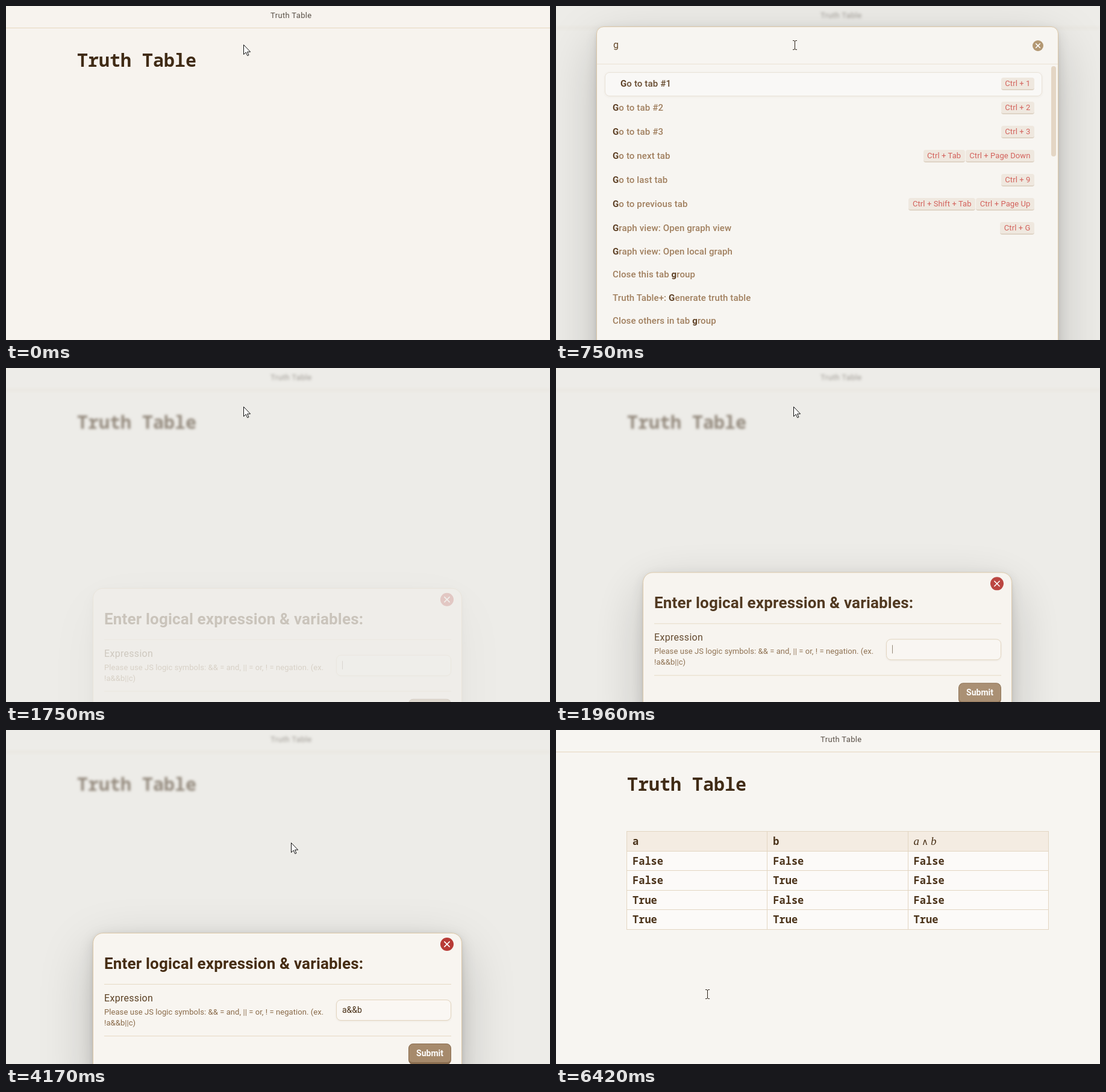
Recreate the animation shown at these times as an HTML page. Size 903x555 px, loop 6490 ms.

```html
<!DOCTYPE html>
<html lang="en">
<head>
<meta charset="utf-8">
<title>Truth Table</title>
<style>
  * { box-sizing: border-box; }
  html, body { margin: 0; width: 100%; height: 100%; overflow: hidden; }
  body { position: relative; background: #f7f3ee; font-family: Roboto, sans-serif; color: #4a3219; }
  #page, #veil { position: absolute; inset: 0; }
  #veil { background: rgba(227, 227, 223, .5); }
  .t, .box { position: absolute; }
  .t { line-height: 20px; white-space: pre; }
  .mono { font-family: "Noto Sans Mono", monospace; }
  .caret { display: inline-block; width: 1px; height: 14px; vertical-align: -2px; background: #8d8171; }
  .tab { font-size: 13px; letter-spacing: .35px; color: #5a5148; }
  .h1 { font-size: 30px; font-weight: 600; color: #402b15; }
  .cell { position: absolute; width: 234.3px; height: 33.5px; padding-left: 9px; line-height: 32px;
    border: 1px solid #e3d6c2; background: #fcfaf8; font-size: 17px; font-weight: 600; }
  .cell.head { background: #f4ece2; font-weight: 700; }
  .math { font: italic 19px "Liberation Serif", serif; }
  .math b { font: 15px "DejaVu Sans", sans-serif; margin: 0 4px; }
  .modal { position: absolute; border: 1px solid #dcc7a6; background: #f8f5f0; overflow: hidden;
    box-shadow: 0 1.8px 7.3px rgba(0,0,0,.071), 0 6.3px 24.7px rgba(0,0,0,.112), 0 30px 90px rgba(0,0,0,.2); }
  #palette { left: 67px; top: 34px; width: 767px; max-height: 640px; border-radius: 12px; background: #f7f5f1; }
  #query { left: 27px; top: 20px; font-size: 16px; color: #654829; }
  #query i { font-style: normal; color: #b7a58f; }
  #rows { margin-top: 61px; padding: 12.5px 13px 14px; border-top: 1px solid #ebe3d4; }
  #rows.scroll { padding-right: 26px; }
  .row { display: flex; align-items: center; height: 38.5px; padding: 0 13px; white-space: pre;
    font-size: 15px; font-weight: 500; letter-spacing: .13px; color: #a07f5e; }
  .row.keyed { height: 40px; }
  .row span { flex: 1; position: relative; top: -1px; }
  .row b { font-weight: 700; color: #5e4126; }
  .row.on { padding: 0 12px 0 25px; border: 1px solid #e9e2d8; border-radius: 8px; background: #f9f8f6;
    color: #664a2e; box-shadow: 0 1px 4px rgba(90, 60, 20, .06); }
  kbd { font: 400 13px Roboto, sans-serif; letter-spacing: .1px; line-height: 19px; padding: 0 6.5px; margin-left: 1px;
    border-radius: 4px; border-bottom: 2px solid #dfd4c6; background: #efe8df; color: #d3625c; }
  #foot { display: flex; justify-content: center; align-items: center; height: 35px; font-size: 13px;
    color: #7d6144; border-top: 1px solid #ebe3d4; background: #f4efe8; white-space: pre; }
  #foot kbd { margin: 0 5px 0 13px; line-height: 16px; font-weight: 700; }
  #foot kbd.sign { font: 700 14px/16px "DejaVu Sans", sans-serif; }
  #foot kbd:first-child { margin-left: 0; }
  #thumb { left: 754px; top: 65px; width: 8px; height: 150px; border-radius: 4px; background: #e4d6c4; }
  #dialog { left: 144px; top: 337px; width: 613px; height: 260px; border-radius: 17px; }
  .title { font-size: 26px; font-weight: 700; letter-spacing: .17px; color: #462d13; }
  .name { font-size: 16px; letter-spacing: .3px; color: #5b4023; }
  .hint { font-size: 13px; letter-spacing: .07px; color: #8a6b4a; line-height: 17.5px; }
  .rule { position: absolute; left: 18px; width: 576px; height: 1px; background: #e6d9c3; }
  .field { left: 403px; top: 110px; width: 191px; height: 35px; border: 1px solid #e3d5bf; border-radius: 8px;
    background: #faf7f3; box-shadow: 0 1px 3px rgba(90, 60, 20, .08); }
  .submit { left: 523px; top: 183px; width: 71px; height: 35px; border: 1px solid #8b6e50; border-bottom-width: 4px;
    border-radius: 8px; background: #a68a6c; color: #fff; font-weight: 700; font-size: 14px; line-height: 30px; text-align: center; }
  svg { position: absolute; overflow: visible; }
</style>
</head>
<body>
<div id="page"></div>
<div id="veil"></div>
<div id="palette" class="modal">
  <div id="query" class="t"></div>
  <div id="rows"></div>
  <div id="foot"><kbd class="sign">↑↓</kbd>to navigate<kbd class="sign">↵</kbd>to use<kbd>esc</kbd>to dismiss</div>
  <div id="thumb" class="box"></div>
</div>
<div id="dialog" class="modal"></div>
<svg id="arrow" width="1" height="1"><path d="M.5 .5V16.5L4.2 13L6.8 18.6L9 17.6L6.5 12.2H11.6Z" fill="#fff" stroke="#111"/></svg>
<svg id="beam" width="1" height="1"><path d="M-3 -7.5H-1L.5 -6.5L2 -7.5H4M.5 -7V7M-3 7.5H-1L.5 6.5L2 7.5H4" fill="none" stroke="#2d241a"/></svg>

<script>
const LOOP = 6490, TICK = 70;
const $ = id => document.getElementById(id);
const show = (el, on) => el.style.display = on ? '' : 'none';
const clamp = v => Math.max(0, Math.min(1, v));
const label = (x, midY, cls, text) =>
  `<div class="t ${cls}" style="left:${x}px;top:${midY - 10}px">${text}</div>`;
const cross = (x, y, r, color) => {
  const a = r * .42;
  return `<svg width="1" height="1" style="left:${x}px;top:${y}px"><circle r="${r}" fill="${color}"/>
    <path d="M${-a} ${-a}L${a} ${a}M${a} ${-a}L${-a} ${a}" stroke="#fff" stroke-width="1.6"/></svg>`;
};
const caret = on => on ? '<span class="caret"></span>' : '';

function truthTable() {
  const word = v => v ? 'True' : 'False';
  const rows = [['a', 'b', '<span class="math">a<b>∧</b>b</span>']];
  for (let n = 0; n < 4; n++) {
    const a = n >> 1, b = n & 1;
    rows.push([a, b, a & b].map(word));
  }
  return rows.map((row, r) => row.map((text, c) =>
    `<div class="cell mono ${r ? '' : 'head'}" style="left:${117 + 233.3 * c}px;top:${168 + 32.5 * r}px">${text}</div>`
  ).join('')).join('');
}

$('page').innerHTML = label(439, 15.5, 'tab', 'Truth Table') + label(118, 89.5, 'mono h1', 'Truth Table') +
  '<div class="box" style="top:36px;width:100%;height:1px;background:#e6d6bf"></div>' +
  `<div id="table">${truthTable()}</div>` +
  '<div id="pageCaret" class="box" style="left:117px;width:1px;height:20px;background:#a39a8d"></div>';

$('palette').insertAdjacentHTML('beforeend', cross(732, 30.5, 9, '#b39873'));

$('dialog').innerHTML = cross(587, 18, 11, '#b83b36') +
  label(18, 49.5, 'title', 'Enter logical expression &amp; variables:') +
  label(18, 108, 'name', 'Expression') +
  label(18, 132, 'hint', 'Please use JS logic symbols: &amp;&amp; = and, || = or, ! = negation. (ex.\n!a&amp;&amp;b||c)') +
  '<div class="rule" style="top:84px"></div><div class="rule" style="top:170px"></div>' +
  '<div class="box field"></div><div id="expr" class="t" style="left:413px;top:117px;font-size:14px"></div>' +
  '<div class="box submit">Submit</div>';

const generate = 'Truth Table+: Generate truth table';
const keys = {
  'Go to tab #1': ['Ctrl + 1'], 'Go to tab #2': ['Ctrl + 2'], 'Go to tab #3': ['Ctrl + 3'],
  'Go to next tab': ['Ctrl + Tab', 'Ctrl + Page Down'], 'Go to last tab': ['Ctrl + 9'],
  'Go to previous tab': ['Ctrl + Shift + Tab', 'Ctrl + Page Up'],
  'Graph view: Open graph view': ['Ctrl + G'], 'Toggle inline math': ['Ctrl + Shift + 4'],
  'Toggle reading view': ['Ctrl + E']
};
const recent = [generate, 'Add file property', 'Add tag', 'Backlinks: Open backlinks', 'Bookmarks: Show bookmarks',
  'Close all other tabs', 'Close current tab', 'Command palette: Open', 'Copy file path', 'Cycle bullet', 'Delete current file',
  'Delete paragraph', 'Export to PDF'];
const startingWithG = ['Go to tab #1', 'Go to tab #2', 'Go to tab #3', 'Go to next tab', 'Go to last tab',
  'Go to previous tab', 'Graph view: Open graph view', 'Graph view: Open local graph', 'Close this tab group',
  generate, 'Close others in tab group', 'Toggle pin', 'Toggle highlight'];
const commands = [generate, 'Note composer: Merge current file with another file…',
  'Toggle default mode for new tabs', 'Outgoing links: Open outgoing links for the current file',
  'Toggle numbered list', 'Toggle inline math', 'Toggle reading view', 'Backlinks: Toggle backlinks in document',
  'Graph view: Open graph view', 'Toggle fold properties in current file', 'Toggle pin', 'Toggle highlight'];

// Greedy fuzzy match: marks matched letters, or returns null.
function mark(text, query) {
  let i = 0;
  const html = [...text].map(ch =>
    i < query.length && ch.toLowerCase() === query[i] ? (i++, `<b>${ch}</b>`) : ch).join('');
  return i === query.length ? html : null;
}

let listed = null;
function listCommands(query) {
  if (query === listed) return;
  listed = query;
  const pool = query === '' ? recent : query === 'g' ? startingWithG : commands;
  const scroll = query.length < 2;
  $('rows').className = scroll ? 'scroll' : '';
  show($('thumb'), scroll);
  $('rows').innerHTML = pool.filter(c => mark(c, query) !== null).map((c, i) => {
    const badges = (keys[c] || []).map(k => `<kbd>${k}</kbd>`).join('');
    return `<div class="row ${badges && 'keyed'} ${i ? '' : 'on'}"><span>${mark(c, query)}</span>${badges}</div>`;
  }).join('');
}

const queries = [[0, ''], [750, 'g'], [1020, 'ge'], [1220, 'gen'], [1290, 'gene'], [1490, 'gener']];
const exprs = [[0, ''], [2360, 'a'], [3090, 'a&amp;'], [3230, 'a&amp;&amp;'], [3630, 'a&amp;&amp;b']];
const latest = (steps, t) => steps.filter(s => s[0] <= t).pop()[1];

const route = [[0, 394, 64], [4030, 394, 64], [4450, 700, 537], [4780, 700, 537], [5270, 415, 290],
  [5330, 414, 286], [5460, 414, 286], [5670, 340, 250], [5950, 251, 439], [LOOP, 251, 439]];
const snap = (t, from) => from + Math.floor((t - from) / TICK) * TICK;

function mouse(t) {
  const i = route.findIndex(p => p[0] > t), [t0, x0, y0] = route[i - 1], [t1, x1, y1] = route[i];
  const u = (snap(t, t0) - t0) / (t1 - t0), e = u * u * (3 - 2 * u);
  return [x0 + (x1 - x0) * e, y0 + (y1 - y0) * e];
}

// Ease-out progress of a window that first shows at `from`.
const opening = (t, from) => t < from ? 0 : 1 - (1 - clamp((snap(t, from) - from + 29) / 400)) ** 3;

function place(win, on, shown, rise) {
  show(win, on);
  win.style.opacity = shown;
  win.style.transform = rise < 1 ? `translateY(${36 * (1 - rise)}px)` : 'none';
}

function render(t) {
  const inPalette = t >= 340 && t < 1750, inDialog = t >= 1750 && t < 4780;
  const closing = t < 4640 ? 1 : t < 4710 ? .55 : t < 4780 ? .15 : 0;
  const first = opening(t, 340), second = opening(t, 1750);
  const dim = first * closing;

  document.body.style.background = t < 340 ? '#f7f3ee' : '#f7f5f1';
  $('page').style.filter = dim ? `blur(${2.1 * dim}px)` : 'none';
  $('veil').style.opacity = dim;
  show($('table'), t >= 4640);
  show($('pageCaret'), (t >= 70 && t < 340) || (t >= 4780 && t < 5330) || (t >= 5870 && t < 6420));
  $('pageCaret').style.top = (t < 340 ? 129 : 352) + 'px';

  const query = latest(queries, t);
  listCommands(query);
  $('query').innerHTML = query + caret(t < 750 || t >= 1020) + (query ? '' : '<i>Select a command...</i>');
  place($('palette'), inPalette, first, first);

  $('expr').innerHTML = latest(exprs, t) + caret(t < 2960 || (t >= 3090 && t < 4160));
  place($('dialog'), inDialog, second * closing, second);

  const arrow = t < 340 || inDialog, [x, y] = mouse(t);
  show($('arrow'), arrow);
  show($('beam'), !arrow);
  const pointer = $(arrow ? 'arrow' : 'beam');
  pointer.style.left = Math.round(x + (inPalette ? 2 : 0)) + 'px';
  pointer.style.top = Math.round(y + (inPalette ? 1 : 0)) + 'px';
}

function frame(now) {
  render(now % LOOP);
  requestAnimationFrame(frame);
}
render(0);
requestAnimationFrame(frame);
</script>
</body>
</html>
```
